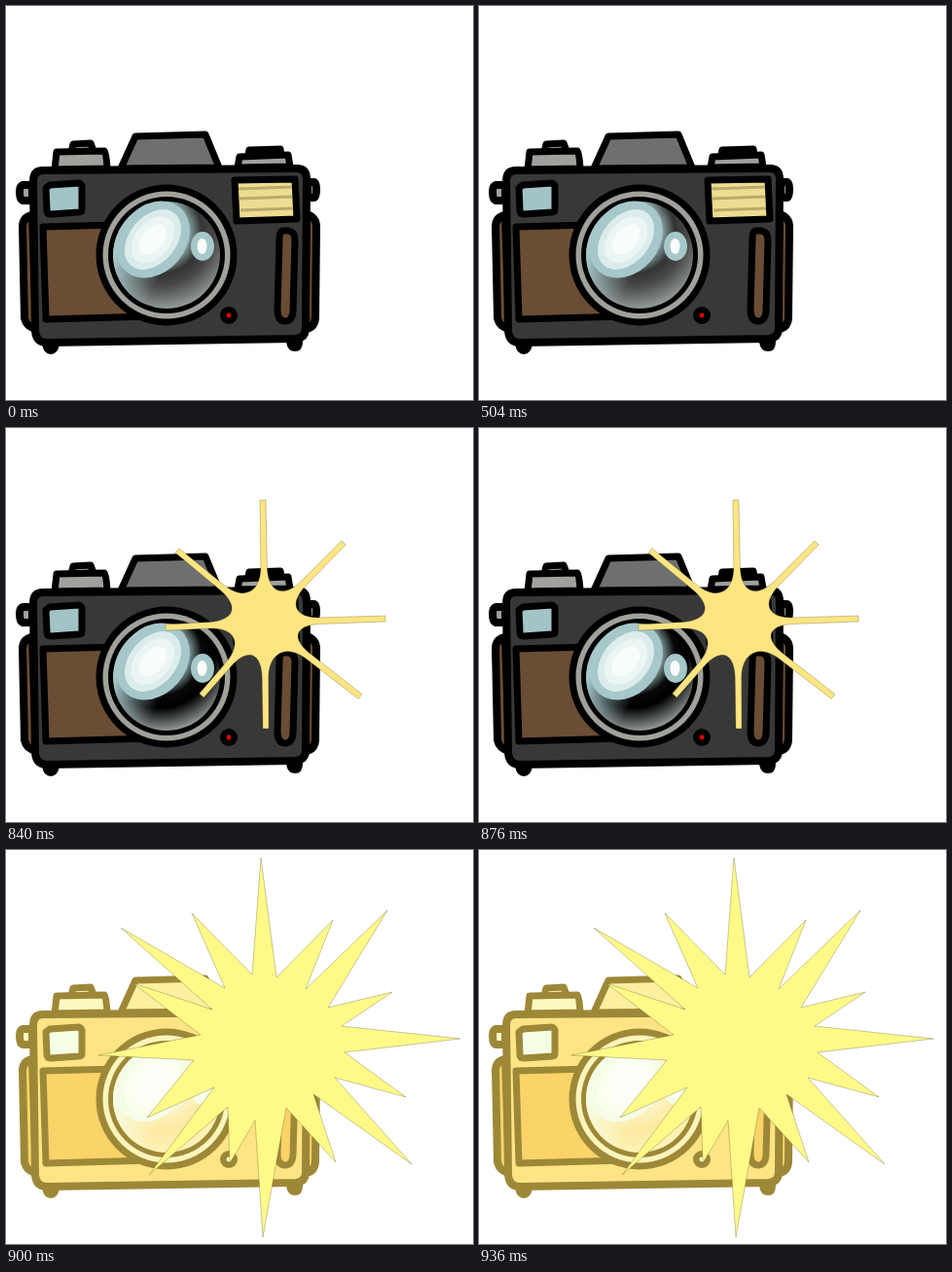
Animation of 480x405 px, one loop 0.96 s. Source, as an HTML page:

```html
<!DOCTYPE html>
<html lang="en">
<head>
<meta charset="utf-8">
<title>Camera flash</title>
<style>
html, body { margin: 0; width: 100%; height: 100%; overflow: hidden; background: #fff; }
svg {
  display: block; width: 480px; height: 405px;
  --line: #000; --body: #383838; --metal: #a0a19d; --hump: #6d706f;
  --leather: #6a4d35; --glass: #a3c4c6; --ring: #a0a19b; --lamp: #f00;
  --dark: #343434; --shade: #484848; --edge: #949a9a;
  --h1: #a6c8ca; --h2: #dcecec; --h3: #ebf6f4; --h4: #f8fdf9;
}
svg.pop { --dark: #080808; --shade: #000; --edge: #949a9a; }
svg.blaze {
  --line: #9d8838; --body: #fee484; --metal: #fcf8c0; --hump: #fdefa0;
  --leather: #fad369; --glass: #f5ffe5; --ring: #fcf5bb; --lamp: #ffffe0;
  --dark: #fdf0b8; --shade: #fdeaa2; --edge: #fff3b8;
  --h1: #f6fde6; --h2: #faffef; --h3: #fbfff4; --h4: #fdfffa;
}
.part { stroke: var(--line); stroke-width: 7; stroke-linejoin: round; stroke-linecap: round; }
.outer { stroke-width: 8; }
.line { fill: var(--line); }
.body { fill: var(--body); }
.metal { fill: var(--metal); }
.hump { fill: var(--hump); }
.leather { fill: var(--leather); }
.glass { fill: var(--glass); }
.ring { fill: var(--ring); }
.lamp { fill: var(--lamp); }
.h1 { fill: var(--h1); }
.h2 { fill: var(--h2); }
.h3 { fill: var(--h3); }
.h4 { fill: var(--h4); }
.burst { visibility: hidden; stroke: #4a451f; stroke-width: .3; }
.pop #spark, .blaze #glare { visibility: visible; }
</style>
</head>
<body>
<svg id="stage" viewBox="0 0 480 405">
  <defs>
    <radialGradient id="lens" gradientUnits="userSpaceOnUse" cx="158" cy="232" r="80">
      <stop offset=".32" style="stop-color:var(--h1)"/>
      <stop offset=".54" style="stop-color:var(--dark)"/>
      <stop offset=".7" style="stop-color:var(--shade)"/>
      <stop offset="1" style="stop-color:var(--edge)"/>
    </radialGradient>
    <linearGradient id="sheen" gradientUnits="userSpaceOnUse" x1="112" y1="258" x2="158" y2="278">
      <stop offset="0" style="stop-color:var(--h1)"/>
      <stop offset="1" style="stop-color:var(--h1);stop-opacity:0"/>
    </linearGradient>
  </defs>

  <!-- sides, lugs and feet -->
  <g class="part outer leather">
    <path d="M27 215Q17 217 17 227L19 321Q21 330 31 332Z"/>
    <path d="M309 214Q319 217 319 227L318 321Q317 331 307 332Z"/>
  </g>
  <g class="part outer metal">
    <path d="M27 184L17 184Q14 185 14 191Q14 199 17 200L27 200Z"/>
    <path d="M310 181L317 181Q319 182 319 188Q319 196 317 197L310 197Z"/>
    <path d="M41 347Q42 354 46 354Q50 354 51 347Z"/>
    <path d="M292 345Q293 351 297 351Q301 351 301 345Z"/>
  </g>

  <!-- top controls -->
  <g class="part">
    <path class="metal" d="M67 150L69 142L87 141L90 149Z"/>
    <path class="metal" d="M52 150L101 149Q103 150 104 167L50 168Z"/>
    <path class="hump" d="M133 134L205 132L219 166L118 167Z"/>
    <path class="metal" d="M249 153L250 148L282 147L283 153Z"/>
    <path class="metal" d="M240 155L290 153L292 165L238 166Z"/>
  </g>

  <!-- housing -->
  <g class="part">
    <path class="outer body" d="M38 169Q28 169 28 180L30 334Q31 346 42 346L298 342Q308 341 308 331L309 178Q309 167 299 167Z"/>
    <path class="glass" d="M45 184L75 182Q78 183 78 186L78 209Q78 212 75 212L46 214Q42 214 42 210L41 187Z"/>
    <path class="leather" d="M38 227L115 225L150 319L41 322Z"/>
    <path class="leather" d="M285 231Q281 231 281 240L279 312Q279 324 287 324Q294 324 295 314L297 241Q297 232 290 231Z"/>
    <path fill="#ecdd91" d="M235 179L297 178L299 219L237 221Z"/>
  </g>
  <g stroke="#b9ab69" stroke-width="3">
    <path d="M239 188L294 186M240 198L294 196M241 210L295 208"/>
  </g>
  <circle class="line" cx="229" cy="318" r="9"/>
  <circle class="lamp" cx="229" cy="318" r="2.4"/>

  <!-- lens -->
  <circle class="line" cx="165" cy="256" r="72.500"/>
  <circle class="ring" cx="165" cy="256" r="65.500"/>
  <circle class="line" cx="165" cy="256" r="60"/>
  <circle fill="url(#lens)" cx="165" cy="256" r="55"/>
  <circle fill="url(#sheen)" cx="165" cy="256" r="55"/>
  <g transform="translate(151 240) rotate(-50)">
    <ellipse class="h1" rx="43" ry="34"/>
    <ellipse class="h2" rx="35" ry="24"/>
    <ellipse class="h3" rx="27" ry="18"/>
    <ellipse class="h4" rx="18" ry="11"/>
  </g>
  <ellipse class="h1" cx="202" cy="247" rx="12" ry="15"/>
  <ellipse class="h4" cx="201.500" cy="247" rx="5" ry="8"/>

  <path id="spark" class="burst" fill="#fee582"/>
  <polygon id="glare" class="burst" fill="#fffa88" points="
    262,8 278,131 336,72 308,143 392,62 331,162 397,146 345,181
    467,194 348,208 411,254 338,234 417,323 316,251 339,321 288,265
    264,398 256,278 230,322 228,264 147,334 214,244 145,275 193,216
    95,211 200,190 131,137 212,164 118,80 225,142 191,65 253,128"/>
</svg>
<script>
const stage = document.getElementById('stage');
const center = [266, 200];
const tips = [[264, 74], [347, 118], [390, 196], [364, 276],
              [267, 309], [201, 275], [164, 205], [176, 126]];

// Point on a ray: distance r from the center, shifted sideways by w.
function along([x, y], r, w) {
  const dx = x - center[0], dy = y - center[1], len = Math.hypot(dx, dy);
  const d = r === null ? len : r;
  const px = center[0] + (dx * d - dy * w) / len;
  const py = center[1] + (dy * d + dx * w) / len;
  return px.toFixed(1) + ' ' + py.toFixed(1);
}

// Thin square-ended rays joined by concave curves.
function sparkPath() {
  return tips.map((tip, i) => {
    const next = tips[(i + 1) % tips.length];
    return (i ? 'L' : 'M') + along(tip, null, -3) + 'L' + along(tip, null, 3) +
      'L' + along(tip, 56, 3.3) +
      'C' + [along(tip, 31, 4), along(next, 31, -4), along(next, 56, -3.3)].join(' ');
  }).join('') + 'Z';
}
document.getElementById('spark').setAttribute('d', sparkPath());

const LOOP = 960;
const steps = [[900, 'blaze'], [840, 'pop'], [0, '']];
let shown = '';

function draw() {
  const t = performance.now() % LOOP;
  const state = steps.find(([from]) => t >= from)[1];
  if (state !== shown) stage.setAttribute('class', shown = state);
  requestAnimationFrame(draw);
}
draw();
</script>
</body>
</html>
```
